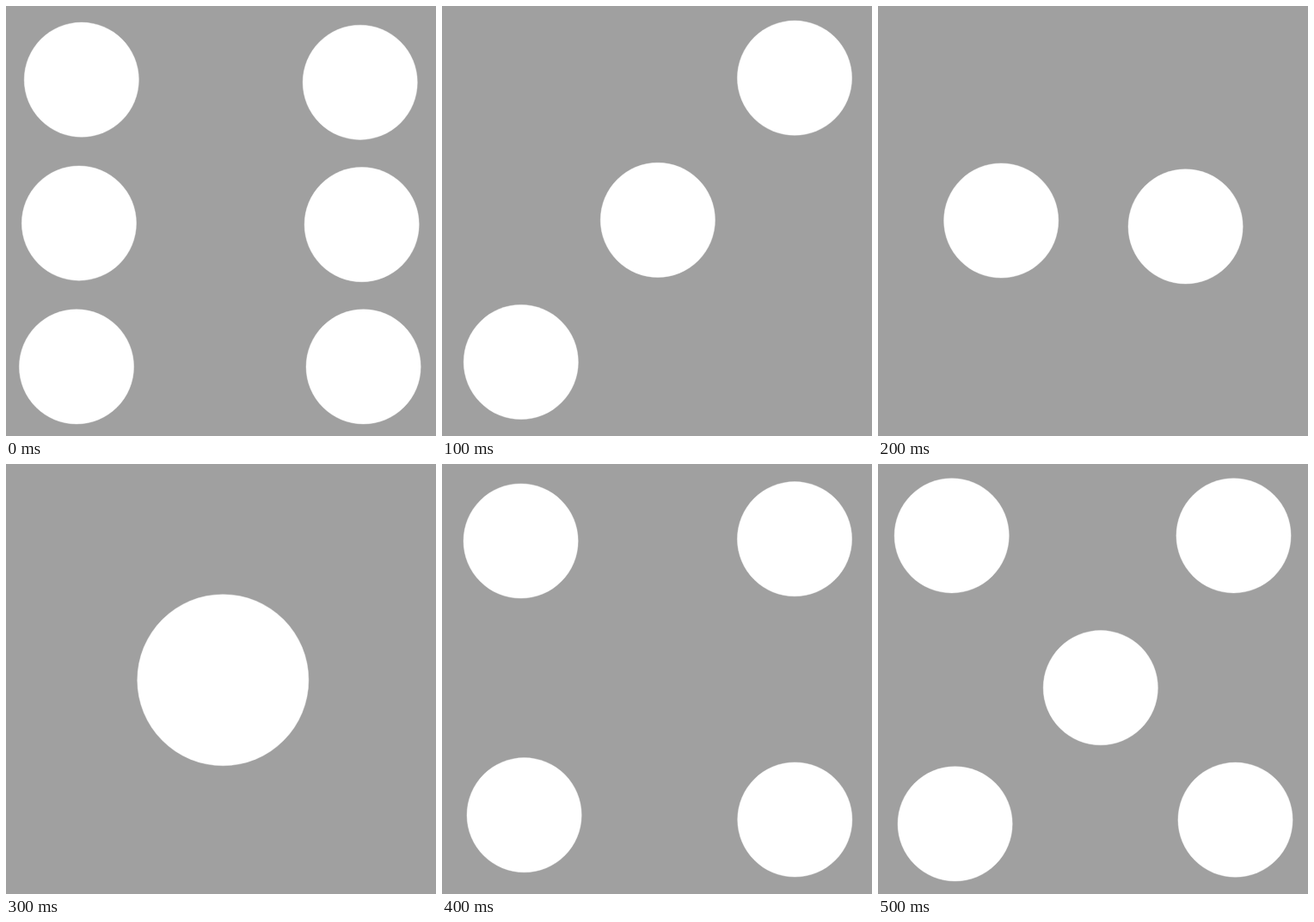
Animation, 500 px wide and 500 px high, one loop 0.6 s. Source, as an HTML page:

```html
<!DOCTYPE html>
<html lang="en">
<head>
<meta charset="utf-8">
<title>Rolling die</title>
<style>
  html, body { margin: 0; width: 100%; height: 100%; overflow: hidden; background: #a0a0a0; }
  svg { display: block; width: 100%; height: 100%; }
  circle { fill: #fff; stroke: #fff; stroke-opacity: .4; }
</style>
</head>
<body>
<svg viewBox="0 0 500 500"><g id="pips"></g></svg>
<script>
  const STEP = 100;
  const RADIUS = 66.6;

  const pip = (x, y, r = RADIUS) => `<circle cx="${x}" cy="${y}" r="${r}"/>`;

  // Evenly spaced pips from one end point to the other.
  function line(count, x1, y1, x2, y2) {
    let row = "";
    for (let i = 0; i < count; i++) {
      const t = i / (count - 1);
      row += pip(x1 + (x2 - x1) * t, y1 + (y2 - y1) * t);
    }
    return row;
  }

  const six = () => line(3, 87.8, 85.7, 82, 419.4) + line(3, 411.7, 88.8, 415.6, 419.4);
  const three = () => line(3, 410, 83.7, 91.8, 414);
  const two = () => line(2, 143.2, 249.5, 357.6, 256.4);
  const one = () => pip(252.3, 251.2, RADIUS * 1.495);
  const four = () => line(2, 91.6, 89.5, 95.6, 408.2) + line(2, 410, 87.2, 410.3, 413.5);
  const five = () => line(2, 85.7, 83.3, 89.6, 418.4) + line(2, 413.5, 83.3, 415.5, 413.7) + pip(258.8, 260.2);

  const roll = [six, three, two, one, four, five];
  const pips = document.getElementById("pips");
  let shown;

  function draw(time) {
    const face = roll[Math.floor(time / STEP) % roll.length];
    if (face === shown) return;
    shown = face;
    pips.innerHTML = face();
  }

  const start = performance.now();

  function tick() {
    draw(performance.now() - start);
    requestAnimationFrame(tick);
  }

  tick();
</script>
</body>
</html>
```
